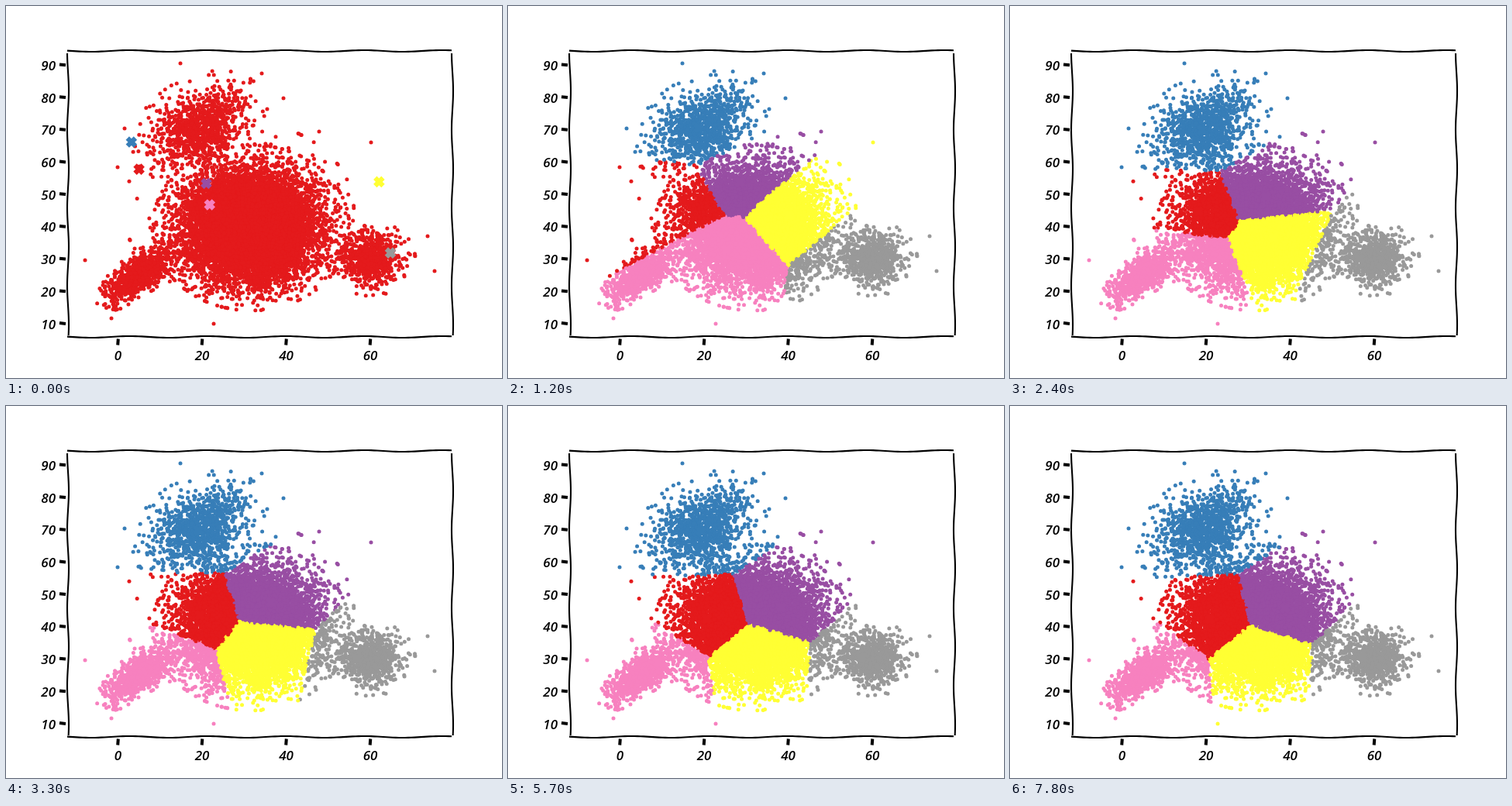
Write an HTML page with a canvas that moves like this. It is 640 by 480 pixels and loops after 8000 ms.

```html
<!DOCTYPE html>
<html lang="en">
<head>
<meta charset="utf-8">
<title>Cluster assignment</title>
<style>
  html, body { margin: 0; width: 100%; height: 100%; overflow: hidden; background: #fff; }
  canvas, svg { position: absolute; left: 0; top: 0; width: 640px; height: 480px; }
  text { font: italic 600 17px "Open Sans", "Noto Sans", sans-serif; }
</style>
</head>
<body>
<canvas id="plot" width="640" height="480"></canvas>
<svg id="axes" viewBox="0 0 640 480"></svg>
<script>
const LOOP = 8000, STEP = 300;
const SX = 5.425, SY = 4.17;
const toX = x => 144.5 + SX * x;
const toY = y => 451.2 - SY * y;

// Each centroid leaves its start, turns at a bend and settles at its end (data units)
const CLUSTERS = [
  { color: '#e41a1c', start: [5, 57.7], bend: [14.8, 47.7], end: [21, 42.1] },
  { color: '#377eb8', start: [3.2, 66.1], bend: [18.7, 70.5], end: [19.3, 69.4] },
  { color: '#984ea3', start: [21, 53.3], bend: [28.5, 53.7], end: [38.9, 45.5] },
  { color: '#f781bf', start: [21.8, 46.7], bend: [25.3, 32.7], end: [8.2, 28.8] },
  { color: '#ffff33', start: [62.1, 53.8], bend: [40.2, 43.3], end: [32.7, 30.9] },
  { color: '#999999', start: [64.8, 31.8], bend: [55.3, 29.5], end: [57.4, 30.4] }
];
const FIRST = 1, BEND = 4;

// Gaussian clouds in pixels; reach limits the radius in standard deviations
const CLOUDS = [
  { count: 10000, x: 316, y: 286, sx: 41, sy: 34.5, corr: 0, reach: 3.1 },
  { count: 1000, x: 250, y: 156, sx: 30, sy: 25, corr: -0.3, reach: 2.9 },
  { count: 800, x: 471, y: 326, sx: 19, sy: 16, corr: 0, reach: 3 },
  { count: 800, x: 171, y: 347, sx: 20, sy: 17, corr: -0.7, reach: 2.7 },
  { count: 400, x: 300, y: 263, sx: 62, sy: 48, corr: 0, reach: 2.4 }
];
const STRAYS = [
  [225, 74], [330, 87], [358, 119], [153, 158], [144, 208], [404, 162],
  [471, 176], [102, 328], [136, 403], [268, 410], [544, 297], [553, 342]
];

let seed = 20177;
function random() {
  seed = (seed + 0x6D2B79F5) | 0;
  let t = Math.imul(seed ^ (seed >>> 15), 1 | seed);
  t = (t + Math.imul(t ^ (t >>> 7), 61 | t)) ^ t;
  return ((t ^ (t >>> 14)) >>> 0) / 4294967296;
}

function makePoints() {
  const points = STRAYS.slice();
  for (const c of CLOUDS) {
    const rest = Math.sqrt(1 - c.corr * c.corr);
    for (let i = 0; i < c.count; i++) {
      const r = Math.min(c.reach, Math.sqrt(-2 * Math.log(1 - random())));
      const a = random() * Math.PI * 2;
      const u = r * Math.cos(a), v = r * Math.sin(a);
      points.push([c.x + c.sx * u, c.y + c.sy * (c.corr * u + rest * v)]);
    }
  }
  return points;
}

function centroid({ start, bend, end }, step) {
  const s = Math.max(FIRST, step);
  const early = s < BEND;
  const [from, to] = early ? [start, bend] : [bend, end];
  const k = early
    ? 1 - Math.pow((BEND - s) / (BEND - FIRST), 2.5)
    : 1 - Math.exp((BEND - s) / 5);
  return [toX(from[0] + (to[0] - from[0]) * k), toY(from[1] + (to[1] - from[1]) * k)];
}

function nearest(x, y, centers) {
  let best = 0, min = Infinity;
  centers.forEach((c, i) => {
    const d = Math.hypot((x - c[0]) / SX, (y - c[1]) / SY);
    if (d < min) { min = d; best = i; }
  });
  return best;
}

const ctx = document.getElementById('plot').getContext('2d');
const points = makePoints();

function drawCross(x, y, color) {
  const r = 5.1;
  ctx.strokeStyle = color;
  ctx.lineWidth = 6.2;
  ctx.beginPath();
  for (const side of [-1, 1]) {
    ctx.moveTo(x - r, y - r * side);
    ctx.lineTo(x + r, y + r * side);
  }
  ctx.stroke();
}

function drawStep(step) {
  const centers = CLUSTERS.map(c => centroid(c, step));
  ctx.clearRect(0, 0, 640, 480);
  for (const [x, y] of points) {
    ctx.fillStyle = CLUSTERS[step ? nearest(x, y, centers) : 0].color;
    ctx.beginPath();
    ctx.arc(x, y, 2.5, 0, Math.PI * 2);
    ctx.fill();
  }
  centers.forEach(([x, y], i) => drawCross(x, y, CLUSTERS[i].color));
}

// Hand-drawn axes
function wobble(from, to, base, phase, upright) {
  const parts = [];
  for (let p = from; p <= to; p += 4) {
    const q = (base + Math.sin(p / 16 + phase)).toFixed(2);
    parts.push(upright ? `${q},${p}` : `${p},${q}`);
  }
  return `<polyline points="${parts.join(' ')}"/>`;
}

function drawAxes() {
  const lines = wobble(79, 578, 58, 1, false) + wobble(79, 578, 427, 1, false) +
                wobble(61, 426, 80, 1, true) + wobble(61, 426, 576, 1, true);
  let ticks = '', labels = '';
  for (let v = 10; v <= 90; v += 10) {
    const y = toY(v);
    ticks += `<path d="M69 ${y - 0.4}L77 ${y + 0.4}"/>`;
    labels += `<text x="64" y="${y + 7}" text-anchor="end">${v}</text>`;
  }
  for (let v = 0; v <= 60; v += 20) {
    const x = toX(v);
    ticks += `<path d="M${x + 0.3} 429.5L${x - 0.3} 437.5"/>`;
    labels += `<text x="${x}" y="456.5" text-anchor="middle">${v}</text>`;
  }
  document.getElementById('axes').innerHTML =
    `<g fill="none" stroke="#000"><g stroke-width="2.1">${lines}</g>` +
    `<g stroke-width="4">${ticks}</g></g>${labels}`;
}

let shown = -1;
const begin = performance.now();
function tick() {
  const step = Math.floor(((performance.now() - begin) % LOOP) / STEP);
  if (step !== shown) {
    shown = step;
    drawStep(step);
  }
  requestAnimationFrame(tick);
}

drawAxes();
tick();
</script>
</body>
</html>
```
